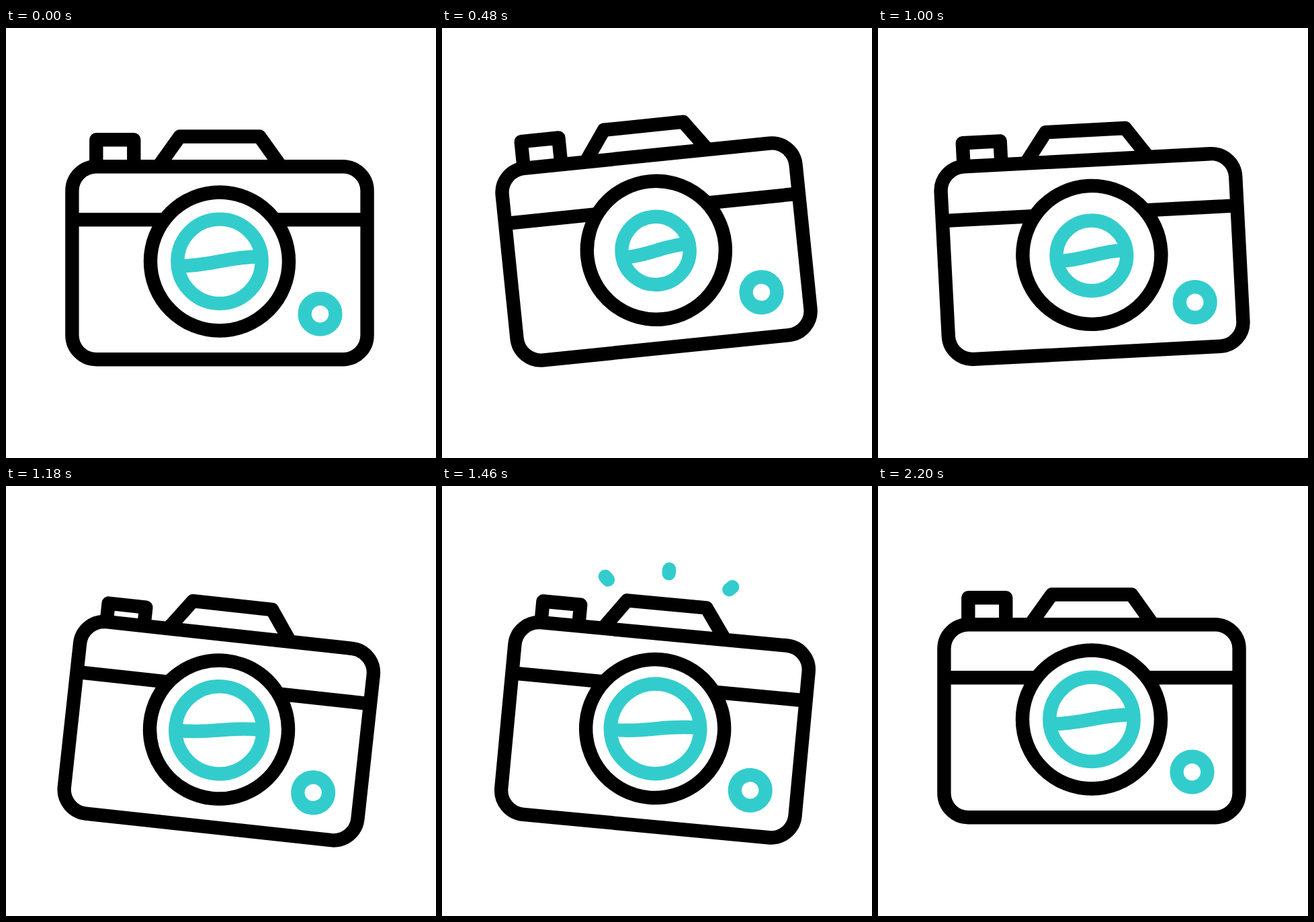
Animation of 640x640 px, one loop 2.22 s. Source, as an HTML page:

```html
<!DOCTYPE html>
<html lang="en">
<head>
<meta charset="utf-8">
<title>Camera</title>
<style>
  html, body { margin: 0; width: 100%; height: 100%; overflow: hidden; background: #fff; }
  svg { display: block; width: 100vw; height: 100vh; }
  svg * { fill: none; stroke: #000; stroke-width: 20.4; stroke-linejoin: round; }
  svg .teal { stroke: #33cccc; }
  svg .ray { stroke-linecap: round; }
</style>
</head>
<body>
<svg viewBox="0 0 640 640">
  <!-- camera coordinates are relative to the lens centre -->
  <g id="camera">
    <path id="shutter"/>
    <path d="M-91.3 -141.3L-59.3 -186H59.3L91.3 -141.3"/>
    <rect x="-219.6" y="-141.3" width="439.2" height="287" rx="36"/>
    <path d="M-219.6 -62.3H219.6"/>
    <circle r="103" style="fill:#fff"/>
    <circle class="teal" cx="149.5" cy="78.2" r="22.9"/>
    <path class="teal ray"/>
    <path class="teal ray"/>
    <path class="teal ray"/>
  </g>
  <g id="glass">
    <circle id="ring" class="teal"/>
    <path id="wave" class="teal"/>
  </g>
</svg>
<script>
  const LOOP = 2220, STEP = 20;
  const KEYS = [0, 800, 1333, 1600];
  const HEAD = [1338, 2025], TAIL = [1508, 2200];
  const LENS = { x: 318, y: 347.5 };

  // start and end of each ray's track
  const RAYS = [
    [227.4, 133.5, 174, 80.3],
    [316.8, 115.8, 316.8, 41],
    [408.4, 131.3, 461, 78]
  ];

  const $ = id => document.getElementById(id);
  const rays = document.querySelectorAll('.ray');
  const mix = (a, b, k) => a + (b - a) * k;

  function ease(t, from, to) {
    const u = Math.min(1, Math.max(0, (t - from) / (to - from)));
    return u * u * (3 - 2 * u);
  }

  // rest -> left tilt -> right tilt -> rest
  function pose(t, rest, left, right) {
    if (t < KEYS[1]) return mix(rest, left, ease(t, KEYS[0], KEYS[1]));
    if (t < KEYS[2]) return mix(left, right, ease(t, KEYS[1], KEYS[2]));
    return mix(right, rest, ease(t, KEYS[2], KEYS[3]));
  }

  function place(el, x, y, angle) {
    el.setAttribute('transform', `translate(${x} ${y}) rotate(${angle})`);
  }

  function drawRays(t) {
    const shown = t >= HEAD[0] && t < TAIL[1];
    const head = ease(t, ...HEAD), tail = ease(t, ...TAIL);
    RAYS.forEach(([x0, y0, x1, y1], i) => {
      const at = k => `${mix(x0, x1, k) - LENS.x} ${mix(y0, y1, k) - LENS.y}`;
      rays[i].setAttribute('d', shown ? `M${at(tail)}L${at(head)}` : '');
    });
  }

  function draw(t) {
    const angle = pose(t, 0, -9, 10);
    place($('camera'), pose(t, LENS.x, 319.3, 316.45), pose(t, LENS.y, 321.7, 372.7), angle);
    place($('glass'), pose(t, 318, 318.2, 317.2), pose(t, 347.3, 322.8, 373.5), angle);

    const top = pose(t, -181.2, -181.2, -166.1);
    $('shutter').setAttribute('d', `M-183.7 -141.5V${top}H-127.7V-141.5`);

    const r = pose(t, 62.7, 44, 70.4), k = r / 62.7;
    $('ring').setAttribute('r', r);
    const p = (x, y) => `${x * k} ${y * k} `;
    $('wave').setAttribute('d',
      `M${p(-62, 7)}C${p(-40, 7)}${p(-20, 4)}0 0S${p(40, -7)}${p(62, -7)}`);

    drawRays(t);
  }

  const start = performance.now();
  function tick() {
    const t = (performance.now() - start) % LOOP;
    draw(Math.floor(t / STEP) * STEP);
    requestAnimationFrame(tick);
  }
  tick();
</script>
</body>
</html>
```
